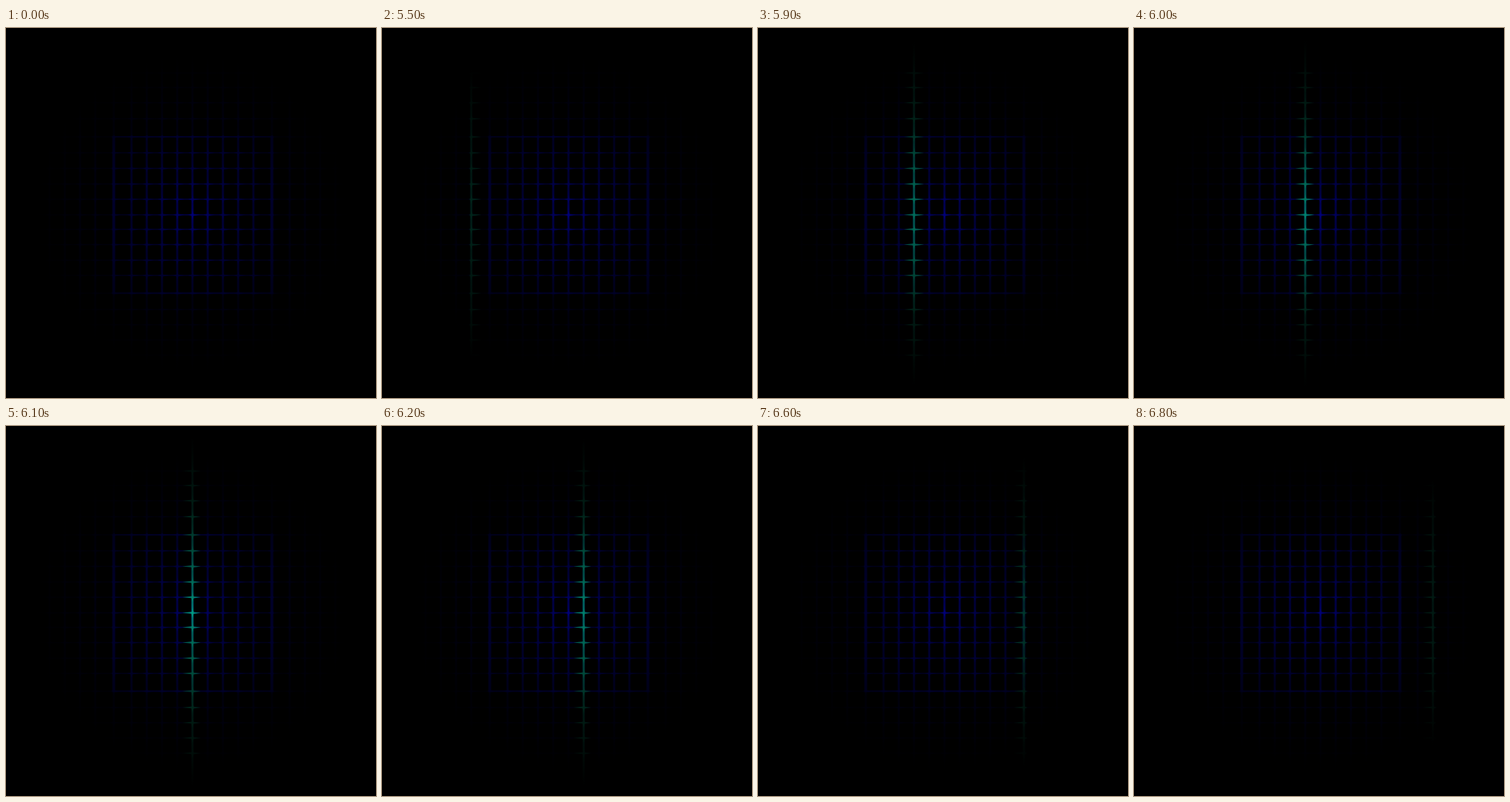
An HTML page for the animation above (7.3 s loop, 510x510 px).

```html
<!DOCTYPE html>
<html lang="en">
<head>
<meta charset="utf-8">
<title>Grid scan</title>
<style>
  html, body { margin: 0; width: 100%; height: 100%; overflow: hidden; background: #000; }
  svg { display: block; width: 100vw; height: 100vh; }
  path { fill: none; }
</style>
</head>
<body>
<svg viewBox="0 0 510 510">
  <defs>
    <radialGradient id="blue" gradientUnits="userSpaceOnUse" cx="257" cy="256" r="220">
      <stop offset="0" stop-color="rgb(0,0,150)"/>
      <stop offset=".1" stop-color="rgb(0,0,108)"/>
      <stop offset=".25" stop-color="rgb(0,0,78)"/>
      <stop offset=".5" stop-color="rgb(0,0,50)"/>
      <stop offset=".72" stop-color="rgb(0,0,27)"/>
      <stop offset="1" stop-color="#000"/>
    </radialGradient>
    <radialGradient id="green" gradientUnits="userSpaceOnUse" cx="257" cy="256" r="240">
      <stop offset="0" stop-color="rgb(0,165,130)"/>
      <stop offset=".12" stop-color="rgb(0,122,95)"/>
      <stop offset=".38" stop-color="rgb(0,74,54)"/>
      <stop offset=".6" stop-color="rgb(0,30,20)"/>
      <stop offset="1" stop-color="#000"/>
    </radialGradient>
    <clipPath id="core"><rect x="146" y="148" width="223" height="219"/></clipPath>
  </defs>
  <g id="grid"></g>
  <g id="scan"></g>
</svg>
<script>
  const columns = [60, 81, 102, 123, 148.5, 173, 194, 215, 236, 257, 278, 299, 320, 341, 366.5, 391, 412, 433, 454];
  const rows = [62, 82, 103, 125, 150, 172, 193.5, 215, 236, 257.5, 277.5, 298.5, 320, 341, 365.5, 388, 409, 430, 451];
  const LOOP = 7300, SCAN_START = 5500, STEP = 100;
  const FIRST = 3, LAST = 16;

  const stroke = (d, paint, width, opacity) =>
    `<path d="${d}" stroke="url(#${paint})" stroke-width="${width}" stroke-opacity="${opacity}"/>`;
  const vertical = x => `M${x} 15V495`;
  const horizontal = y => `M40 ${y}H475`;
  const star = (x, y, left, right, tall) =>
    `M${x - left} ${y}L${x} ${y - 1.6}V${y - tall}L${x + 1.6} ${y - 1}L${x + right} ${y}` +
    `L${x + 1.4} ${y + 1.4}L${x} ${y + tall}L${x - 1.4} ${y + 1.2}Z`;
  const fill = (d, paint, opacity) =>
    `<path d="${d}" style="fill:url(#${paint})" fill-opacity="${opacity}"/>`;

  function drawGrid() {
    const tall = columns.map(vertical).join('');
    const wide = rows.map(horizontal).join('');
    const nodes = columns.map(x => rows.map(y => star(x, y, 6, 10, 6)).join('')).join('');
    const lines = stroke(tall, 'blue', 4, .25) + stroke(tall, 'blue', 2, .5) +
      stroke(wide, 'blue', 1.6, .5) + fill(nodes, 'blue', .6);
    const sides = 'M148.5 150V365.5M366.5 150V365.5';
    const caps = 'M148 150H367M148 365.5H367';
    document.getElementById('grid').innerHTML =
      `<g opacity=".5">${lines}</g><g clip-path="url(#core)" opacity=".75">${lines}</g>` +
      stroke(sides, 'blue', 4, .6) + stroke(caps, 'blue', 2, .6);
  }

  function beam(x) {
    const left = x < 180 ? 3 : 14;
    const right = x < 216 ? 14 : Math.max(5, 14 - (x - 215) / 17);
    const nodes = rows.map(y => star(x, y, left, right, 7)).join('');
    return stroke(vertical(x), 'green', 4, .3) + stroke(vertical(x), 'green', 2, .65) +
      fill(nodes, 'green', .85);
  }

  const scan = document.getElementById('scan');
  let shown = null;

  function render(time) {
    const t = time % LOOP;
    const column = t < SCAN_START ? -1
      : Math.min(LAST, FIRST + Math.floor((t - SCAN_START) / STEP));
    if (column !== shown) {
      scan.innerHTML = column < 0 ? '' : beam(columns[column]);
      shown = column;
    }
  }

  function tick() {
    render(performance.now());
    requestAnimationFrame(tick);
  }

  drawGrid();
  tick();
</script>
</body>
</html>
```
